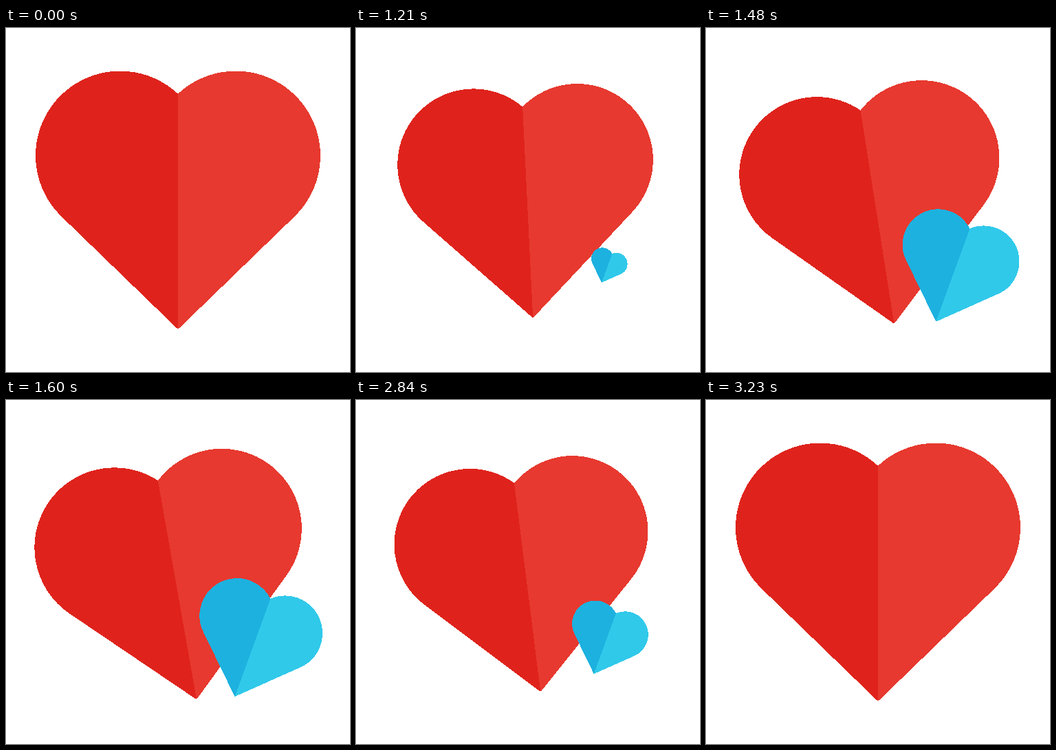
An HTML page for the animation above (3260 ms loop, 500 px wide and 500 px high).

```html
<!DOCTYPE html>
<html lang="en">
<head>
<meta charset="utf-8">
<title>Two hearts</title>
<style>
  html, body { margin: 0; height: 100%; overflow: hidden; background: #fff; }
  svg { display: block; width: 100%; height: 100%; }
</style>
</head>
<body>
<svg viewBox="0 0 500 500" shape-rendering="crispEdges">
  <defs>
    <!-- Heart halves around the origin; the left one reaches one unit under the right -->
    <path id="left" d="M0-154.3A123 123 0 0 0-207-64.5A123 123 0 0 0-169.5 23.9L-2 186Q-1 187 0 187L1 186V-153.5Z"/>
    <path id="right" d="M0-154.3A123 123 0 0 1 207-64.5A123 123 0 0 1 169.5 23.9L2 186Q1 187 0 187Z"/>
  </defs>
  <g id="red">
    <use href="#left" fill="#df231c"/>
    <use href="#right" fill="#e7392f"/>
  </g>
  <g id="blue">
    <use href="#left" fill="#1db1df"/>
    <use href="#right" fill="#30c9ea"/>
  </g>
</svg>
<script>
const LOOP = 3260, STEP = 30, STEPS = 20, OPEN_AT = 1030, CLOSE_AT = 2660;
const RED_TILTED = 0.944, BLUE_SIZE = 0.4425;
const red = document.getElementById('red');
const blue = document.getElementById('blue');

const clamp = v => Math.min(1, Math.max(0, v));
const mix = (a, b, p) => a + (b - a) * p;

// Smooth ease from 0 to 1 while s runs from start to end
function ease(s, start = 0, end = 1) {
  const u = clamp((s - start) / (end - start));
  return u * u * (3 - 2 * u);
}

const stepped = (t, from) => clamp((Math.floor((t - from) / STEP) + 1) / STEPS);

// Shrink to a low point halfway, then grow to the final size
const dip = (s, a, low, b) =>
  s < 0.5 ? mix(a, low, ease(s, 0, 0.5)) : mix(low, b, ease(s, 0.5, 1));

function draw(t) {
  const closing = t >= CLOSE_AT;
  const s = stepped(t, closing ? CLOSE_AT : OPEN_AT);
  const tilt = closing ? 1 - ease(s) : ease(s);
  const redScale = closing ? dip(s, RED_TILTED, 0.88, 1) : dip(s, 1, 0.87, RED_TILTED);
  const grow = closing ? 1 - ease(s, 0.01, 0.82) : ease(s, 0.03, 0.92);

  red.setAttribute('transform',
    `translate(${250 - 3.8 * tilt} ${250 + 10.6 * tilt}) rotate(${-10 * tilt}) scale(${redScale})`);
  blue.setAttribute('transform',
    `translate(${367.3 - 6.3 * grow} ${344.5 + 8.5 * grow}) rotate(20) scale(${BLUE_SIZE * grow})`);
  blue.setAttribute('visibility', grow > 0 ? 'visible' : 'hidden');
}

function tick() {
  draw(performance.now() % LOOP);
  requestAnimationFrame(tick);
}
tick();
</script>
</body>
</html>
```
